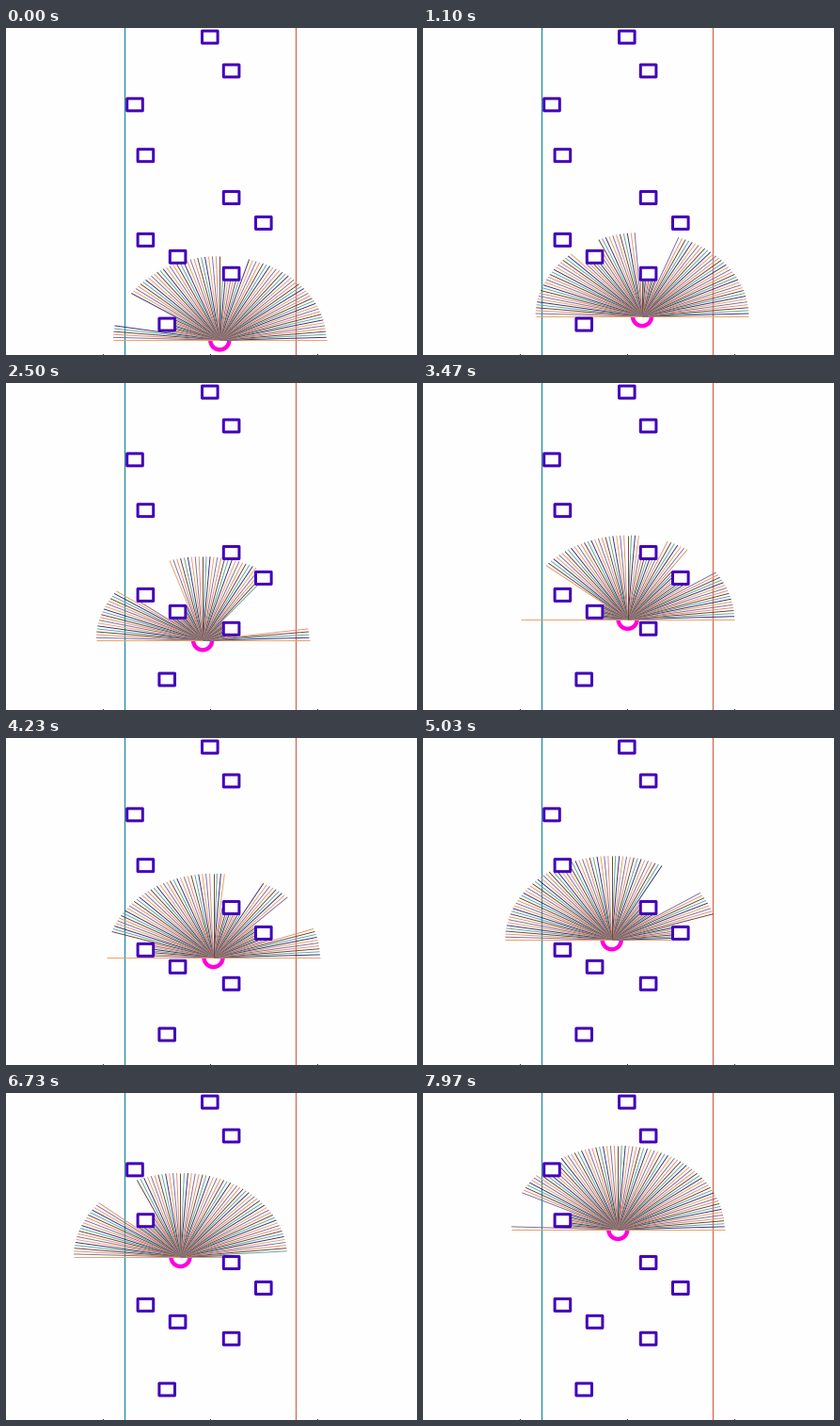
A matplotlib script for the animation above (8000 ms loop, 437 px wide and 347 px high).

```python
import numpy as np
import matplotlib.pyplot as plt
from matplotlib.animation import FuncAnimation
from matplotlib.collections import LineCollection
from matplotlib.patches import Arc, Rectangle

W, H, DPI = 437, 347, 100
STEP, LOOP = 40, 8000
PX = 72 / DPI                      # points per pixel
UNIT = np.array([11.4, 8.97])      # pixels per world unit
ORIGIN = np.array([216.8, 9.6])    # pixel place of the first obstacle
REACH = 9.95                       # sensor range in world units
HALF = 0.85 * UNIT                 # half size of an obstacle

# obstacles as (column, row) in world units
CELLS = np.array([(0, 0), (2, 4), (-7, 8), (-6, 14), (2, 19),
                  (5, 22), (-6, 24), (-3, 26), (2, 28), (-4, 34)])
BOXES = ORIGIN + CELLS * UNIT

# turning points of the robot as (ms, x); it climbs at a steady speed
TURNS = [(0, 227.3), (900, 233), (1200, 233), (2700, 205), (2850, 205),
         (3600, 221), (4200, 220.5), (5030, 200), (5700, 185.8),
         (6200, 183.7), (6750, 185.6), (8000, 208)]
START_Y, CLIMB = 331.4, 0.02342

COLORS = ["#e8a060", "#3c2c78", "#5aa898", "#6e4038", "#e0906c", "#7c6ca0"]

angles = np.radians(np.arange(0, 181, 2))
rays = np.column_stack([np.cos(angles), -np.sin(angles)]) * REACH * UNIT + 1e-9


def robot(t):
    return np.array([np.interp(t, *zip(*TURNS)), START_Y - CLIMB * t])


def scan(pos):
    """Ray segments from pos, each cut where it meets the nearest obstacle."""
    rel = BOXES - pos
    a = (rel - HALF)[None] / rays[:, None]
    b = (rel + HALF)[None] / rays[:, None]
    near = np.minimum(a, b).max(axis=2)
    far = np.maximum(a, b).min(axis=2)
    hit = (near <= far) & (near >= 0) & (near < 1)
    length = np.where(hit, near, 1).min(axis=1)
    tips = pos + rays * length[:, None]
    return np.stack([np.broadcast_to(pos, tips.shape), tips], axis=1)


fig = plt.figure(figsize=(W / DPI, H / DPI), dpi=DPI, facecolor="#fefefe")
ax = fig.add_axes([0, 0, 1, 1])
ax.set_xlim(0, W)
ax.set_ylim(H, 0)
ax.axis("off")

# road borders and axis ticks
for side, color in ((-8, "#2a8fa6"), (8, "#d9705a")):
    x = ORIGIN[0] + side * UNIT[0]
    ax.plot([x, x], [0, H], color=color, lw=1.4 * PX, zorder=1)
for side in (-10, 0, 10):
    x = ORIGIN[0] + side * UNIT[0]
    ax.plot([x, x], [346, 347], color="#444444", lw=PX, zorder=1)

body = Arc((0, 0), 20, 20, theta1=0, theta2=180, color="#ff00dc",
           lw=4.4 * PX, zorder=2)
ax.add_patch(body)
beams = LineCollection([], colors=COLORS, linewidths=0.95 * PX, zorder=3)
ax.add_collection(beams)

for cx, cy in BOXES:
    ax.add_patch(Rectangle((cx - 8.3, cy - 6.5), 16.6, 13, fill=False,
                           ec="#4200ba", lw=3 * PX, joinstyle="round",
                           snap=False, zorder=4))


def update(i):
    pos = robot(i * STEP)
    body.set_center(pos)
    beams.set_segments(scan(pos))
    return body, beams


anim = FuncAnimation(fig, update, frames=LOOP // STEP, interval=STEP,
                     repeat=True, repeat_delay=0)
plt.show()
```
